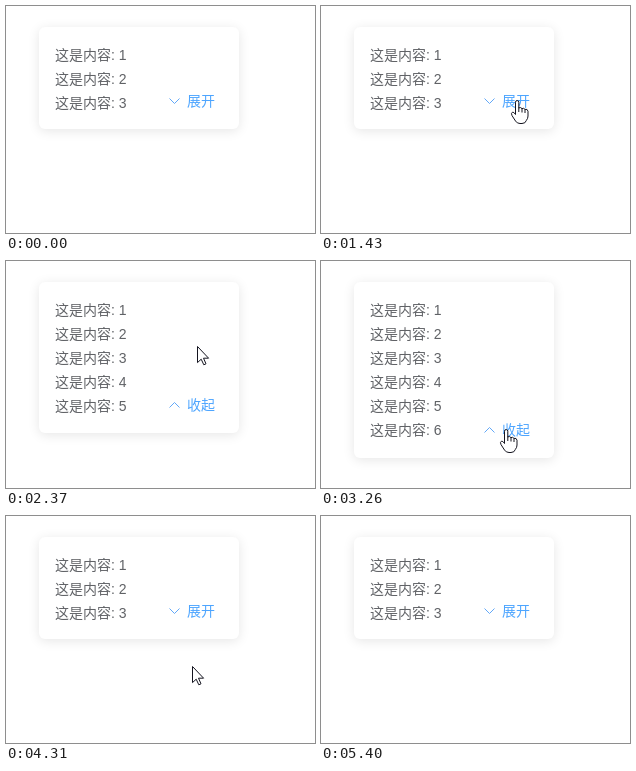
An HTML page that plays this animation: 309 px wide and 227 px high, repeating every 6.64 s.

```html
<!DOCTYPE html>
<html lang="zh-CN">
<head>
<meta charset="utf-8">
<title>展开 / 收起</title>
<style>
  html, body { margin: 0; width: 100%; height: 100%; overflow: hidden; background: #fff; }
  #card {
    position: absolute; left: 33px; top: 21px; width: 200px;
    border-radius: 6px; background: #fff; box-shadow: 0 2px 12px rgba(0, 0, 0, .1);
  }
  svg { position: absolute; left: 0; top: 0; display: block; }
  text { font: 14px "Liberation Sans", "Noto Sans CJK SC", "Noto Sans CJK", sans-serif; }
  #rows { fill: #606266; }
  #label { fill: #4da5ff; }
  #chevron { fill: none; stroke: #62a8f8; stroke-width: 1; }
  #cursor path { fill: #fff; stroke: #14141f; stroke-width: 1; stroke-linejoin: round; }
  #cursor .crease { fill: none; }
</style>
</head>
<body>
<div id="card"></div>
<svg width="309" height="227" viewBox="0 0 309 227">
  <clipPath id="clip"><rect id="window" x="33" y="37" width="200" height="70"/></clipPath>
  <g id="rows" clip-path="url(#clip)"></g>
  <g id="link">
    <path id="chevron"/>
    <text id="label" x="181" y="5"></text>
  </g>
  <g id="cursor">
    <path id="arrow" d="M.5 .5V16.6L4.2 13.2L6.8 18.8L9 17.8L6.5 12.2H11.6Z"/>
    <g id="hand">
      <path d="M-1.5 13V2.2a1.6 1.6 0 0 1 3.3 0V8q1.6-1.3 3.2.6q1.6-1 3 .8q2.5-.8 3 1.8V16q0 2.4-1.6 4.4Q8.500 23.500 5 23.500H3Q0 23.500-1.500 21L-5 15.600Q-6.300 13-4.500 12.200Q-3.200 11.700-1.500 14.500Z"/>
      <path class="crease" d="M1.800 7.500V12M5 8.500V12.500M8 9.500V13"/>
    </g>
  </g>
</svg>
<script>
const LOOP = 6640, CLOSED = 70, OPEN = 144;
const $ = id => document.getElementById(id);

$("rows").innerHTML = Array.from({ length: 6 }, (_, i) =>
  `<text x="49" y="${54 + 24 * i}">这是内容: ${i + 1}</text>`).join("");

const power = p => u => u ** p;
const slowing = p => u => 1 - (1 - u) ** p;
const smooth = u => u * u * (3 - 2 * u);

// The standard CSS "ease" curve
function ease(x) {
  if (x <= 0) return 0;
  if (x >= 1) return 1;
  let lo = 0, hi = 1, s;
  for (let i = 0; i < 24; i++) {
    s = (lo + hi) / 2;
    if (.75 * s * (1 - s) + s ** 3 < x) lo = s; else hi = s;
  }
  return .3 * s * (1 - s) ** 2 + 3 * s * s * (1 - s) + s ** 3;
}

const moves = [
  { start: 990, end: 1615, steps: 10, from: [214, 222], to: [191, 85], fx: slowing(1.27), fy: slowing(2.26) },
  { start: 2746, end: 3260, steps: 8, from: [191, 85], to: [185, 168], fx: smooth, fy: smooth },
  { start: 4115, end: 4440, steps: 5, from: [185, 168], to: [186, 138], fx: power(1), fy: power(1) },
  { start: 4440, end: 4640, steps: 2, from: [186, 138], to: [188, 130], fx: power(1), fy: power(1) },
  { start: 4756, end: 5400, steps: 10, from: [188, 130], to: [261, 236], fx: power(1.5), fy: power(1.9) }
];

function pointer(t) {
  if (t < 990 || t >= 5400) return null;
  const m = moves.filter(v => v.start <= t).pop();
  const n = Math.floor((t - m.start) / (m.end - m.start) * m.steps + 1e-6);
  const u = Math.min(n / m.steps, 1);
  const at = (i, f) => Math.round(m.from[i] + (m.to[i] - m.from[i]) * f(u));
  return [at(0, m.fx), at(1, m.fy)];
}

const openTicks = [2290, 2370, 2440, 2510];
const closeTicks = [3960, 4010, 4060, 4130, 4190, 4250];
const lastTick = (ticks, t) => ticks.filter(v => v <= t).pop();

function contentHeight(t) {
  const closing = lastTick(closeTicks, t), opening = lastTick(openTicks, t);
  if (closing) return Math.round(OPEN + (CLOSED - OPEN) * ease((closing - 3953) / 300));
  if (opening) return Math.round(OPEN * ease((opening - 2213) / 300));
  return CLOSED;
}

function render(t) {
  const h = contentHeight(t), linkY = h + 25;
  const expanded = t >= 2120 && t < 3810;
  $("card").style.height = h + 32 + "px";
  $("window").setAttribute("height", h);
  $("link").setAttribute("transform", `translate(0 ${linkY})`);
  $("label").textContent = expanded ? "收起" : "展开";
  $("chevron").setAttribute("d", expanded ? "M163.5 2.5L168.500-2.500L173.500 2.500" : "M163.5-2.500L168.500 2.500L173.500-2.500");

  const p = pointer(t);
  $("cursor").style.display = p ? "" : "none";
  if (!p) return;
  const [x, y] = p;
  const over = x >= 163 && x <= 210 && Math.abs(y - linkY) <= 10;
  $("cursor").setAttribute("transform", `translate(${x} ${y})`);
  $("arrow").style.display = over ? "none" : "";
  $("hand").style.display = over ? "" : "none";
}

const begin = performance.now();
function frame() {
  render((performance.now() - begin) % LOOP);
  requestAnimationFrame(frame);
}
frame();
</script>
</body>
</html>
```
